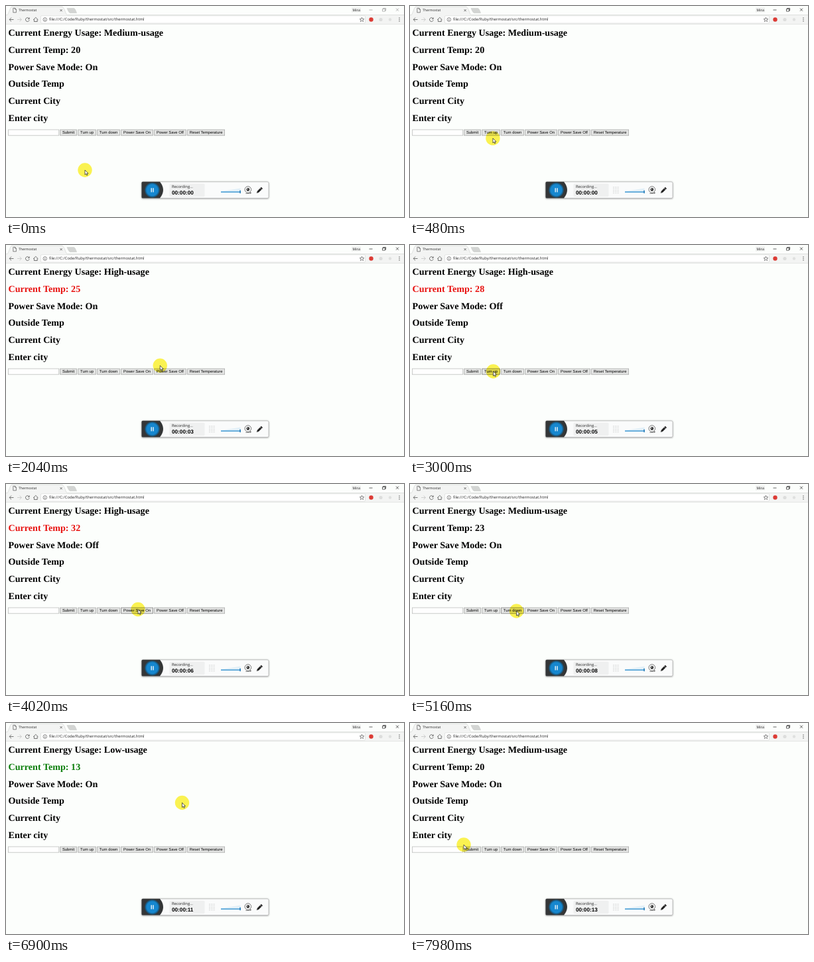
Recreate the animation shown at these times as an HTML page. Size 600 by 319 pixels, loop 8000 ms.

```html
<!DOCTYPE html>
<html lang="en">
<head>
<meta charset="utf-8">
<title>Thermostat</title>
<style>
  html, body { margin: 0; height: 100%; overflow: hidden; background: #fcfefc; }
  svg { display: block; width: 600px; height: 319px; }
  text { text-rendering: geometricPrecision; white-space: pre; }
  .ui { font-family: "Open Sans", sans-serif; fill: #222; }
  .heading { font: bold 14.1px "Liberation Serif", serif; }
  .button text { font: 5.86px "Liberation Sans", sans-serif; text-anchor: middle; }
  .button rect { fill: #e3e4e3; stroke: #a9aaa9; stroke-width: .8; }
  .button.hover rect { stroke: #808180; }
  .line { fill: none; stroke: #555; stroke-width: .8; }
  .spot { fill: #fdf352; mix-blend-mode: multiply; }
</style>
</head>
<body>
<svg viewBox="0 0 600 319">
  <defs>
    <filter id="shadow" x="-5%" y="-30%" width="110%" height="160%">
      <feDropShadow dx="0" dy=".6" stdDeviation="1.1" flood-color="#000" flood-opacity=".4"/>
    </filter>
    <radialGradient id="blue">
      <stop offset=".72" stop-color="#1687cf"/>
      <stop offset=".86" stop-color="#17618f"/>
      <stop offset="1" stop-color="#2b3f4b"/>
    </radialGradient>
  </defs>
  <rect width="600" height="319" fill="#fcfefc"/>

  <!-- tab strip -->
  <path d="M0 13.5H2C4 13 6 1 9 1H84C88 1 90 13 92 13.5H600V27.5H0Z" fill="#f3f4f3"/>
  <path d="M0 13.5H2C4 13 6 1 9 1H84C88 1 90 13 92 13.5H600" fill="none" stroke="#cfd1cf" stroke-width=".6"/>
  <path d="M92 3.5H102.5Q104 3.5 106.5 10.5H96.5Q95 10.5 92 3.5Z" fill="#d3d5d3" stroke="#c2c4c2" stroke-width=".5"/>
  <path class="line" d="M10.8 3.3H13.6L15.4 5V9.8H10.8ZM13.6 3.3V5H15.4" style="stroke-width:.7"/>
  <text class="ui" x="19" y="8.4" font-size="5.05">Thermostat</text>
  <path class="line" d="M81.5 5L84.7 8.2M84.7 5L81.5 8.2"/>
  <rect x="521" y="2.5" width="14" height="7" fill="#eeefee"/>
  <text class="ui" x="522.5" y="8" font-size="5">Mina</text>
  <path id="controls" class="line" d="M547.5 6H552.5M567.5 4.5H571.5V8H567.5ZM568.7 4.5V3.4H572.6V6.8H571.5M588 3.5L592 7.7M592 3.5L588 7.7" style="stroke-width:.7"/>

  <!-- toolbar -->
  <path d="M0 27.5H600" stroke="#e0e2e0" stroke-width=".8"/>
  <rect x="52.5" y="14.8" width="489" height="11.2" rx="1" fill="#fff" stroke="#d3d5d3" stroke-width=".6"/>
  <path class="line" d="M11.5 20.5H5.3M8 17.6L5.1 20.5L8 23.4"/>
  <path class="line" d="M17 20.5H23.2M20.5 17.6L23.4 20.5L20.5 23.4" style="stroke:#c4c5c4"/>
  <path class="line" d="M34.7 18.8A2.9 2.9 0 1 0 35.2 21.3M35.2 17.4V19.6H33"/>
  <path class="line" d="M41.2 20.8L44.8 17.3L48.4 20.8M42.4 20.2V23.5H47.2V20.2"/>
  <circle class="line" cx="58.8" cy="20.5" r="2.8" style="stroke-width:.7"/>
  <path class="line" d="M58.8 20V22.2M58.8 18.7V19.3"/>
  <text class="ui" x="65" y="22.4" font-size="5.88">file:///C:/Code/Ruby/thermostat/src/thermostat.html</text>
  <path class="line" d="M536.5 17.2L537.4 19.5L539.8 19.7L537.9 21.2L538.6 23.6L536.5 22.3L534.4 23.6L535.1 21.2L533.2 19.7L535.6 19.5Z" style="stroke-width:.7"/>
  <circle cx="550.5" cy="20.5" r="3.2" fill="#dc3b35"/>
  <circle cx="565" cy="20.5" r="2.6" fill="#dcdddc"/>
  <circle cx="579" cy="20.5" r="2.2" fill="#dfe0df"/>
  <path d="M593 17.6v1.2M593 19.9v1.2M593 22.2v1.2" stroke="#555" stroke-width="1.2"/>

  <!-- page -->
  <g id="headings"></g>
  <rect x="3.6" y="187" width="76" height="8.8" fill="#fff" stroke="#bcbebc" stroke-width=".8"/>
  <g id="buttons"></g>

  <!-- recorder -->
  <rect x="204.5" y="265.8" width="191.5" height="24.8" rx="2" fill="#fafbfb" stroke="#b0b1b1" stroke-width=".8" filter="url(#shadow)"/>
  <path d="M206 265.8H232Q242 278.2 232 290.6H206Q204.5 290.6 204.5 289V267.5Q204.5 265.8 206 265.8Z" fill="#343637"/>
  <circle cx="220.5" cy="278.3" r="11.6" fill="url(#blue)"/>
  <path d="M219.2 275.2V281.4M222 275.2V281.4" stroke="#fff" stroke-width="1.3"/>
  <rect x="246.5" y="268.8" width="53" height="19.4" rx="1.5" fill="#eff0f0"/>
  <text class="ui" x="250" y="274.6" font-size="5.8">Recording...</text>
  <text id="clock" x="250" y="285.2" font-family="Liberation Sans, sans-serif" font-weight="bold" font-size="8.2"></text>
  <path id="meter" d="M307 273V284M310.3 273V284M313.6 273V284" stroke="#e6e7e7" stroke-width="2.3" stroke-dasharray="1.2 .5"/>
  <path d="M324 280.3L353.5 275.5V280.3Z" fill="#e3f0f8"/>
  <path d="M324 281.2H354" stroke="#2b8fd0" stroke-width="1.4"/>
  <path d="M353 278.7V283.2" stroke="#2479b5" stroke-width="1.5"/>
  <circle class="line" cx="364.8" cy="277.5" r="4.8"/>
  <circle cx="364.8" cy="277.5" r="2.4" fill="#333"/>
  <circle cx="364.2" cy="276.8" r=".8" fill="#ddd"/>
  <path class="line" d="M361.4 283.4H367.6M368.6 281.4V283.8M367.4 282.6H369.8"/>
  <path d="M377.8 283L378.7 279.9L384.8 273.8L387 276L380.9 282.1Z" fill="#222"/>
  <path d="M378.7 281.4L379.5 282.2M383 275.2L385.6 277.8" stroke="#fff" stroke-width=".6"/>

  <g id="cursor">
    <circle class="spot" r="10.7"/>
    <path d="M0 0V7.1L1.7 5.6L2.8 8.1L3.9 7.6L2.8 5.2H5Z" fill="#fff" stroke="#222" stroke-width=".7"/>
  </g>
</svg>
<script>
const LOOP = 8000, STEP = 60, CLOCK_RATE = 1.68;
const $ = id => document.getElementById(id);

function add(parent, tag, attributes, content = "") {
  const node = document.createElementNS("http://www.w3.org/2000/svg", tag);
  for (const name in attributes) node.setAttribute(name, attributes[name]);
  node.textContent = content;
  parent.append(node);
  return node;
}

const headings = ["", "", "", "Outside Temp", "Current City", "Enter city"].map((label, i) =>
  add($("headings"), "text", { class: "heading", x: 3.6, y: 45.2 + i * 25.7 }, label));

const buttons = [
  ["Submit", 81.6, 106.4], ["Turn up", 108.7, 135.4], ["Turn down", 137.6, 171.4],
  ["Power Save On", 173.6, 221.4], ["Power Save Off", 223.6, 271.4], ["Reset Temperature", 273.6, 329.6]
].map(([label, left, right]) => {
  const node = add($("buttons"), "g", { class: "button" });
  add(node, "rect", { x: left, y: 187, width: right - left, height: 8.8 });
  add(node, "text", { x: (left + right) / 2, y: 193.4 }, label);
  return { node, left, right };
});

// time, x, y
const path = [
  [0, 119, 248], [120, 119, 248], [600, 126, 191], [720, 128, 190], [1440, 128, 190],
  [1800, 190, 160], [2160, 247, 190], [2340, 247, 190], [2700, 125.5, 191], [3600, 125.5, 191],
  [3960, 199, 189.5], [4200, 199, 189.5], [4680, 160.5, 192], [6480, 160.5, 192],
  [6900, 265.5, 120.5], [7260, 300, 190], [7440, 300, 190], [7980, 81, 184]
];

// first click, time between clicks, temperatures shown after each click
const clicks = [
  [0, 0, [20]],
  [660, 90, [21, 22, 23, 24, 25]],
  [2800, 90, [26, 27, 28, 29, 30, 31, 32]],
  [4130, 0, [25]],
  [4920, 115, [24, 23, 23, 22, 21, 20, 19, 18, 17, 15, 14]],
  [6380, 0, [13]],
  [7340, 0, [20]]
].flatMap(([start, gap, temps]) => temps.map((temp, i) => [start + gap * i, temp]));

function cursorAt(t) {
  const i = Math.max(1, path.findIndex(key => key[0] >= t));
  const [t0, x0, y0] = path[i - 1], [t1, x1, y1] = path[i];
  const u = (t - t0) / (t1 - t0), k = u * u * (3 - 2 * u);
  return [x0 + (x1 - x0) * k, y0 + (y1 - y0) * k];
}

function draw(t) {
  const temp = clicks.filter(click => click[0] <= t).pop()[1];
  const [usage, color] = temp < 18 ? ["Low", "#0a7d0a"] : temp < 25 ? ["Medium", "#000"] : ["High", "#e8110f"];
  headings[0].textContent = `Current Energy Usage: ${usage}-usage`;
  headings[1].textContent = `Current Temp: ${temp}`;
  headings[1].style.fill = color;
  headings[2].textContent = `Power Save Mode: ${t >= 2300 && t < 4130 ? "Off" : "On"}`;

  const [x, y] = cursorAt(t);
  // x and y attributes keep the spot blending with the page, unlike a group transform
  for (const part of $("cursor").children) part.setAttribute("transform", `translate(${x} ${y})`);
  for (const { node, left, right } of buttons)
    node.classList.toggle("hover", x > left && x < right && y > 186.5 && y < 196);

  const seconds = Math.floor(t * CLOCK_RATE / 1000);
  $("clock").textContent = "00:00:" + String(seconds).padStart(2, "0");
  $("meter").style.opacity = t < STEP ? 0 : 1;
  $("controls").style.stroke = t < STEP ? "#999" : "#222";
}

function frame(now) {
  const t = now % LOOP;
  draw(t - t % STEP);
  requestAnimationFrame(frame);
}
draw(0);
requestAnimationFrame(frame);
</script>
</body>
</html>
```
